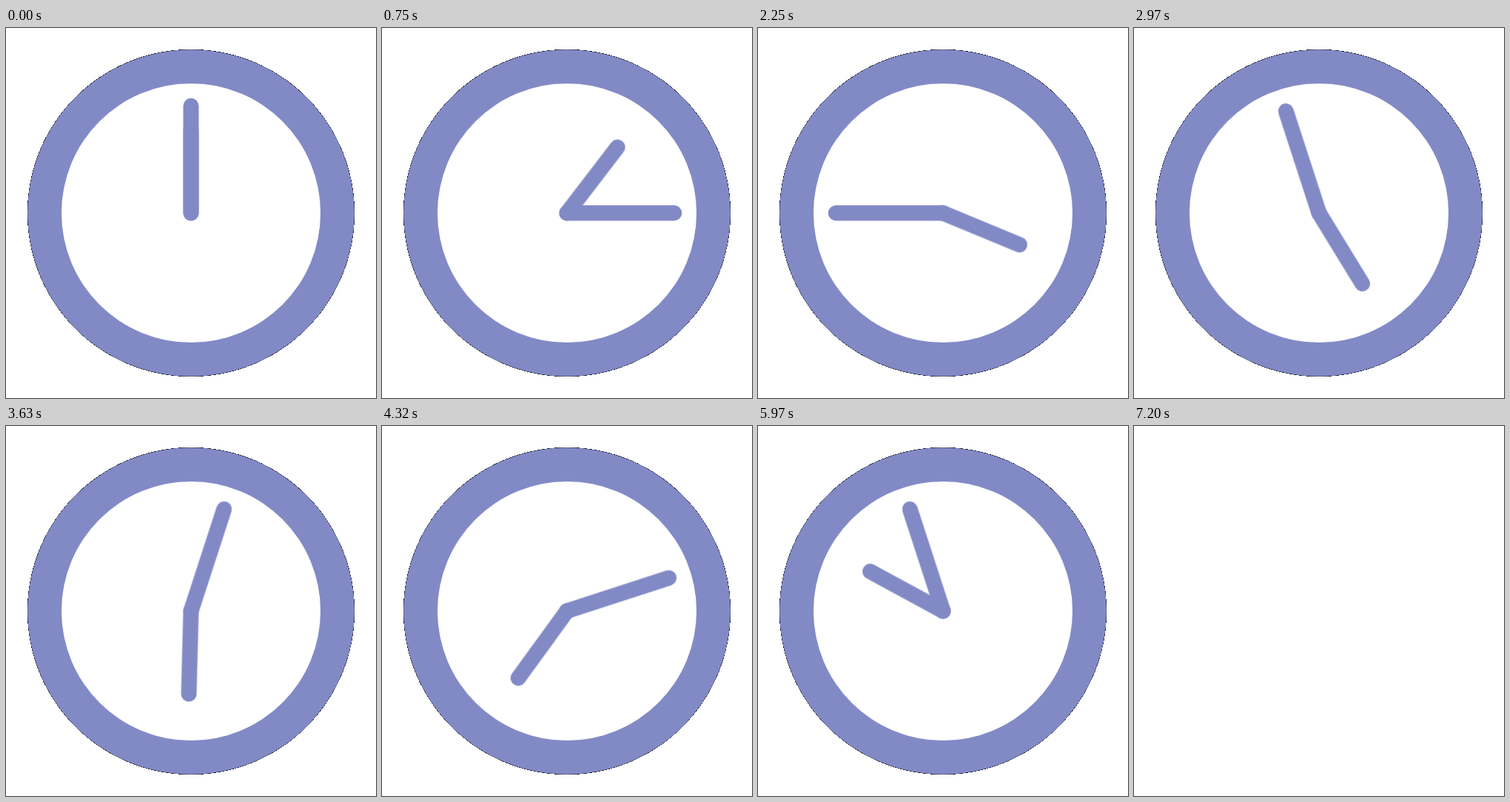
Write an HTML page that moves like this. It is 500 by 500 pixels and loops after 7230 ms.

```html
<!DOCTYPE html>
<html lang="en">
<head>
<meta charset="utf-8">
<title>Clock</title>
<style>
  html, body {
    margin: 0;
    width: 100%;
    height: 100%;
    overflow: hidden;
    background: #fff;
  }
  svg {
    display: block;
    width: 100%;
    height: 100%;
  }
  .edge { shape-rendering: crispEdges; }
  .rim { fill: #828ac6; }
  .face { fill: #fff; }
  .hand {
    stroke: #828ac6;
    stroke-width: 21;
    stroke-linecap: round;
    transform-origin: 250px 250px;
  }

  /* 241 ticks of 30 ms: 18deg per tick for minutes, 1.5deg for hours */
  .minute { animation: minute 7230ms steps(241) infinite; }
  .hour { animation: hour 7230ms steps(241) infinite; }
  .clock { animation: blink 7230ms step-end infinite; }

  @keyframes minute { from { transform: rotate(0deg); } to { transform: rotate(4338deg); } }
  @keyframes hour { from { transform: rotate(0deg); } to { transform: rotate(361.5deg); } }

  /* The clock is gone for the last tick */
  @keyframes blink {
    0% { opacity: 1; }
    99.585%, 100% { opacity: 0; }
  }
</style>
</head>
<body>
<svg viewBox="0 0 500 500">
  <g class="clock">
    <!-- The smooth rim blends into the hard black disc, leaving a thin dark outline -->
    <circle class="edge" cx="250" cy="250" r="221.2"/>
    <circle class="rim" cx="250" cy="250" r="220.8"/>
    <circle class="face" cx="250" cy="250" r="175"/>
    <line class="hand hour" x1="250" y1="250" x2="250" y2="138"/>
    <line class="hand minute" x1="250" y1="250" x2="250" y2="105.3"/>
  </g>
</svg>
</body>
</html>
```
